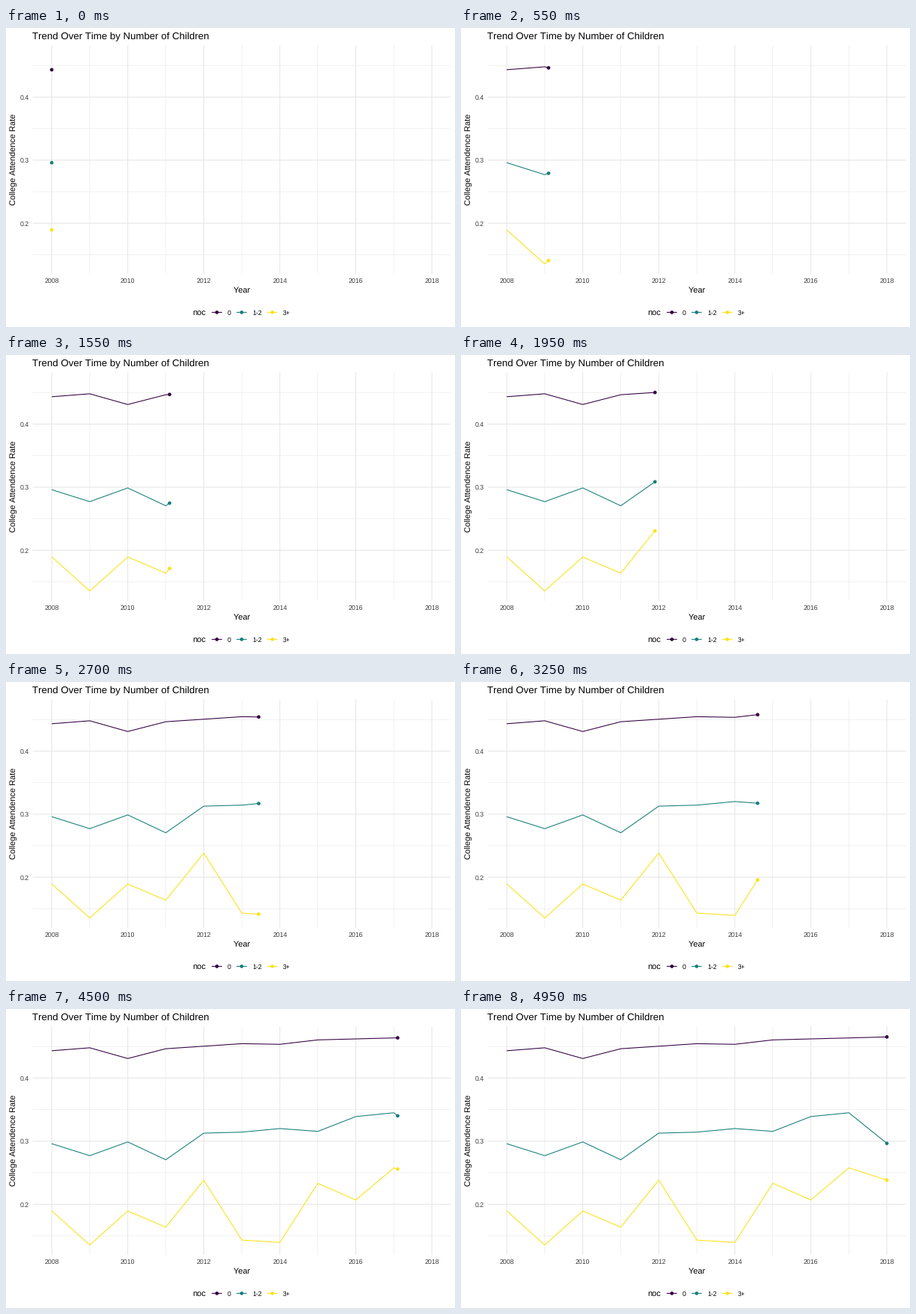
A matplotlib script that plays this animation: 600x400 px, repeating every 5000 ms.

```python
import numpy as np
import matplotlib.pyplot as plt
from matplotlib.animation import FuncAnimation
from matplotlib.patches import Circle

W, H, DPI = 600, 400, 72
FRAMES, INTERVAL = 100, 50
LEFT, RIGHT, TOP, BOTTOM = 35.7, 594.5, 23.3, 329
LINE_W, RADIUS = 1.07, 2.35
GAMMA = 2.2 / 1.8  # the plot's colours are shown slightly darkened

YEARS = np.arange(2008, 2019)
# Rates at the bends; steady stretches are straight lines
RATES = {
    "0": [.4433, .448, .431, *np.linspace(.4465, .4545, 3), .4535,
          *np.linspace(.4605, .4652, 4)],
    "1-2": [.296, .277, .2988, .2705, .3127, .3143,
            .320, .3155, .339, .345, .2965],
    "3+": [.1895, .1355, .1893, .1637, .2382, .1432,
           .1395, .2333, .2068, .2577, .2383],
}

# A kerning factor of 6 sets letters without pair kerning
plt.rcParams.update({"font.family": "Liberation Sans",
                     "text.hinting": "none", "text.kerning_factor": 6})


def darken(rgb):
    return tuple(np.array(rgb) ** GAMMA)


GRID, GREY = darken([.92] * 3), darken([.3] * 3)
COLORS = [darken(plt.cm.viridis(v)[:3]) for v in (0, .5, 1.0)]


def px(year):
    return 61.1 + 50.8 * (np.asarray(year) - 2008)


def py(rate):
    return 92.4 + 844 * (0.4 - np.asarray(rate))


fig = plt.figure(figsize=(W / DPI, H / DPI), dpi=DPI, facecolor="white")
ax = fig.add_axes([0, 0, 1, 1])
ax.set(xlim=(0, W), ylim=(H, 0))
ax.axis("off")


def stroke(x, y, color, width=LINE_W, z=2):
    return ax.plot(x, y, color=color, lw=width, zorder=z, snap=False,
                   solid_capstyle="butt", solid_joinstyle="round")[0]


def dot(x, y, color):
    return ax.add_patch(Circle((x, y), RADIUS, facecolor=color, lw=0,
                               zorder=3, snap=False))


def label(x, y, text, size, color="black", **kw):
    ax.text(x, y, text, fontsize=size, color=color, va="baseline", **kw)


def grid(years, rates, width, z):
    for x in px(years):
        stroke([x, x], [TOP, BOTTOM], GRID, width, z)
    for y in py(rates):
        stroke([LEFT, RIGHT], [y, y], GRID, width, z)


ticks = np.arange(2, 5) / 10
grid(YEARS[1::2], np.arange(.15, .5, .1), LINE_W / 2, 0)
grid(YEARS[::2], ticks, LINE_W, 1)

mid_x, mid_y = (LEFT + RIGHT) / 2, (TOP + BOTTOM) / 2
label(35, 15, "Trend Over Time by Number of Children", 13.2)
label(mid_x, 354, "Year", 11, ha="center")
label(14, mid_y, "College Attendence Rate", 11, ha="center",
      rotation=90, rotation_mode="anchor")
for year in YEARS[::2]:
    label(px(year), 341, str(year), 8.8, GREY, ha="center")
for rate in ticks:
    label(30.75, py(rate) + 3.4, f"{rate:.1f}", 8.8, GREY, ha="right")

# Legend
label(249.4, 385, "noc", 11)
for name, color, x in zip(RATES, COLORS, (281.8, 314.9, 355.9)):
    stroke([x - 6.9, x + 6.9], [380.4, 380.4], color)
    dot(x, 380.4, color)
    label(x + 14.1, 384, name, 8.8)

lines = [stroke([], [], color) for color in COLORS]
dots = [dot(0, 0, color) for color in COLORS]

# Each year is reached on a whole frame
KEYS = np.round((FRAMES - 1) * np.arange(len(YEARS)) / (len(YEARS) - 1))


def update(frame):
    now = np.interp(frame, KEYS, YEARS)
    trail = np.append(YEARS[YEARS < now], now)
    xs = px(trail)
    for line, point, rates in zip(lines, dots, RATES.values()):
        ys = py(np.interp(trail, YEARS, rates))
        line.set_data(xs, ys)
        point.center = xs[-1], ys[-1]
    return lines + dots


anim = FuncAnimation(fig, update, frames=FRAMES, interval=INTERVAL,
                     init_func=lambda: update(0), repeat=True, repeat_delay=0)
plt.show()
```
